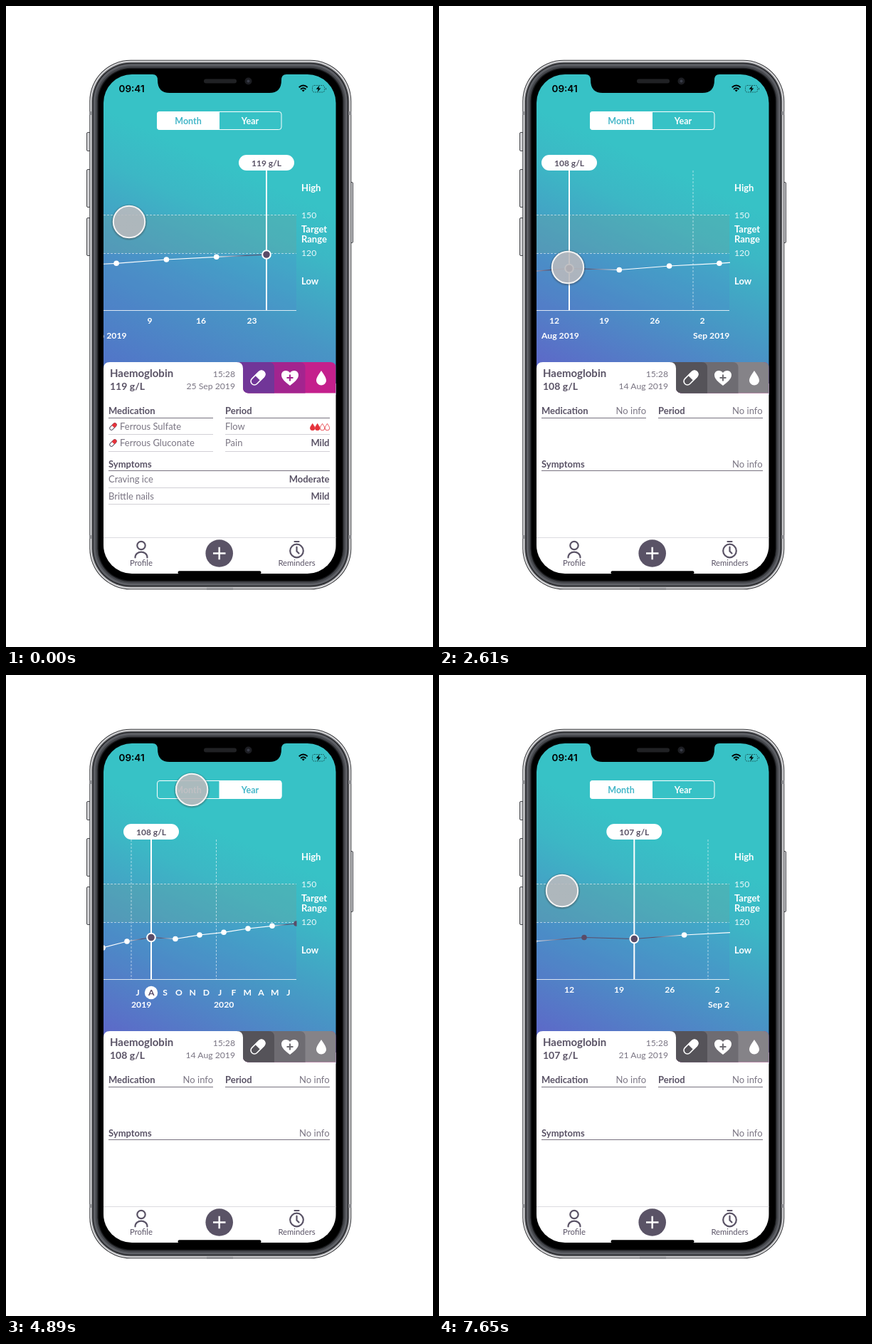
Animation of 600x900 px, one loop 7890 ms. Source, as an HTML page:

```html
<!DOCTYPE html>
<html lang="en">
<head>
<meta charset="utf-8">
<style>
html, body { margin: 0; width: 100%; height: 100%; overflow: hidden; background: #fff; }
svg { display: block; width: 600px; height: 900px; font: 13px Lato, "Open Sans", sans-serif; fill: #5a5366; }
.b { font-weight: 700; }
.w { fill: #fff; }
.l { fill: #7a7583; }
.m { text-anchor: middle; }
.e { text-anchor: end; }
.s { font-size: 12.2px; }
.dash { stroke: #fff; stroke-dasharray: 3 2; opacity: .55; }
.rule { stroke: #77727f; }
.thin { stroke: #d2d0d6; }
.ink { fill: none; stroke: #5a5366; stroke-width: 2.2; stroke-linecap: round; }
</style>
</head>
<body>
<svg viewBox="0 0 600 900">
  <defs>
    <linearGradient id="sky" gradientUnits="userSpaceOnUse" x1="137" y1="145" x2="2" y2="444">
      <stop offset="0" stop-color="#37c2c6"/>
      <stop offset=".2" stop-color="#3cb7c5"/>
      <stop offset=".55" stop-color="#4895c5"/>
      <stop id="deep" offset="1"/>
    </linearGradient>
    <radialGradient id="shadow"><stop offset=".85" stop-color="#333" stop-opacity=".45"/><stop offset="1" stop-color="#333" stop-opacity="0"/></radialGradient>
    <clipPath id="screen"><rect x="137" y="96" width="326.5" height="701" rx="40"/></clipPath>
    <clipPath id="plot"><rect x="137" y="200" width="271.5" height="290"/></clipPath>
    <path id="drop" d="M0-10C3-5 7-1 7 4A7 6.500 0 0 1-7 4C-7-1-3-5 0-10Z"/>
    <g id="pill">
      <rect x="-12" y="-5" width="24" height="10" rx="5" fill="none" stroke-width="1.600"/>
      <path d="M0-5H7A5 5 0 0 1 7 5H0Z"/>
    </g>
    <g id="redpill" transform="rotate(-45) scale(.48)">
      <rect x="-12" y="-5" width="24" height="10" rx="5" fill="#fff" stroke="#5a5366" stroke-width="2"/>
      <path d="M0-5.500H7A5.500 5.500 0 0 1 7 5.500H0Z" fill="#e5323b"/>
    </g>
  </defs>

  <g id="body">
    <g fill="#d3d3d6" stroke="#48494d">
      <rect x="113.500" y="177.500" width="5" height="26" rx="1.500"/>
      <rect x="113.500" y="229.500" width="5" height="53" rx="1.500"/>
      <rect x="113.500" y="297.500" width="5" height="53" rx="1.500"/>
      <rect x="483" y="247.500" width="4.500" height="85" rx="1.500"/>
    </g>
    <g id="shell"></g>
    <path d="M117 150.500h4M481 150.500h4M117 745.500h4M481 745.500h4" stroke="#8d8e92" stroke-width="5"/>
    <path d="M282 818.500h37" stroke="#77787c" stroke-width="2"/>
  </g>

  <g clip-path="url(#screen)">
    <rect x="137" y="96" width="327" height="450" fill="url(#sky)"/>
    <rect x="137" y="293" width="271" height="54" fill="#6d9e98" opacity=".3"/>
    <rect x="137" y="347" width="271" height="80" fill="#5a70cc" opacity=".13"/>

    <rect x="212.500" y="148.500" width="174.500" height="25" rx="3.500" fill="none" stroke="#fff"/>
    <path id="half" d="M216 148H300V174H216A4 4 0 0 1 212 170V152A4 4 0 0 1 216 148Z" fill="#fff"/>
    <g class="b m" font-size="12.500">
      <text id="month" x="256" y="165.500">Month</text>
      <text id="year" x="343" y="165.500">Year</text>
    </g>

    <path class="dash" d="M137 293.500H408M137 347.500H408"/>
    <path d="M137 427.500H408" stroke="#fff" opacity=".8"/>
    <g class="w">
      <g class="b"><text x="415" y="259.500">High</text><text x="415" y="317.500">Target</text><text x="415" y="331.500">Range</text><text x="415" y="391">Low</text></g>
      <g class="s" opacity=".9"><text x="415" y="297.500">150</text><text x="415" y="351">120</text></g>
    </g>

    <g clip-path="url(#plot)">
      <path id="sepLine" class="dash" d="M0 231V427"/>
      <g id="days" class="w b s"></g>
      <g id="months" class="w b s">
        <path class="dash" d="M176 231V427M295.500 231V427"/>
        <circle cx="204" cy="446" r="9.200"/>
      </g>
      <g id="line"></g>
      <g id="marks"></g>
    </g>

    <rect x="137" y="530" width="327" height="270" fill="#fff"/>
    <g id="tabsOn"></g>
    <g id="tabsOff"></g>
    <path d="M137 544V509Q137 500 146 500H324Q333 500 333 509V544Z" fill="#fff"/>
    <g class="w">
      <use href="#pill" transform="translate(354 522) rotate(-45)" stroke="#fff"/>
      <path d="M399 533C393 528 387 524 387 518C387 511 396 510 399 515C402 510 411 511 411 518C411 524 405 528 399 533Z"/>
      <use href="#drop" transform="translate(443 522)"/>
    </g>
    <path id="cross" d="M399 517.500v9M394.500 522h9" stroke-width="2"/>

    <text class="b" x="146" y="521" font-size="15">Haemoglobin</text>
    <text class="e s l" x="322" y="520.500">15:28</text>
    <g id="cards"></g>
    <g class="b"><text x="144" y="573">Medication</text><text x="308" y="573">Period</text><text x="144" y="647.500">Symptoms</text></g>
    <path class="rule" d="M144 578.500H291M308 578.500H455M144 652.500H455"/>

    <g id="details">
      <path class="thin" d="M144 601.500H291M308 601.500H455M144 625.500H291M308 625.500H455M144 676.500H455M144 699.500H455"/>
      <use href="#redpill" transform="translate(150.500 590.500)"/>
      <use href="#redpill" transform="translate(150.500 613.500)"/>
      <g class="l">
        <text x="160" y="595">Ferrous Sulfate</text><text x="160" y="618">Ferrous Gluconate</text>
        <text x="308" y="595">Flow</text><text x="308" y="618">Pain</text>
        <text x="144" y="669">Craving ice</text><text x="144" y="692.500">Brittle nails</text>
      </g>
      <g class="b e"><text x="454.500" y="618">Mild</text><text x="454.500" y="669">Moderate</text><text x="454.500" y="692.500">Mild</text></g>
      <g id="flow" stroke="#e5323b" stroke-width="1.800"></g>
    </g>
    <g id="none" class="e l"><text x="291" y="573">No info</text><text x="454.500" y="573">No info</text><text x="454.500" y="647.500">No info</text></g>

    <path d="M137 746.500H464" stroke="#dcdbe0"/>
    <g class="ink">
      <circle cx="190" cy="757.500" r="5.700"/>
      <path d="M181.500 774.500C181.500 764 198.500 764 198.500 774.500"/>
      <circle cx="408.500" cy="765" r="9.300"/>
      <path d="M408.500 759.500V765.500L411.500 768.500M405.500 752H411.500"/>
    </g>
    <circle cx="299.700" cy="768.500" r="19.300"/>
    <path d="M291 768.500H308.500M299.700 759.700V777.300" stroke="#fff" stroke-width="2.500"/>
    <g class="m" font-size="11.300"><text x="190" y="786">Profile</text><text x="408.500" y="786">Reminders</text></g>
    <rect x="241.500" y="793.300" width="117" height="4" rx="2" fill="#000"/>

    <path d="M206 95V96Q213 96 213 104Q213 122 230 122H370Q387 122 387 104Q387 96 394 96V95Z" fill="#000"/>
    <text x="158.500" y="120.500" fill="#000" font-family="Inter, sans-serif" font-weight="600" font-size="13.500">09:41</text>
    <g fill="none" stroke="#000" stroke-width="1.900">
      <path d="M411.700 114.300Q417.700 108.800 423.700 114.300M414 117Q417.700 113.700 421.400 117"/>
      <rect x="430.500" y="111.500" width="17" height="9.500" rx="2.500" stroke-width=".8" stroke-dasharray="2 1" opacity=".6"/>
    </g>
    <path d="M415.700 118.300Q417.700 116.700 419.700 118.300L417.700 120.500ZM440.500 111.500L435.700 116.800H438.800L437.500 121L442.300 115.500H439.300ZM449 114.500q1.500 1.700 0 3.400z" fill="#000"/>
    <rect x="278" y="102.500" width="46" height="6" rx="3" fill="#202124"/>
    <circle cx="340.500" cy="105.500" r="5" fill="#1c1d22"/><circle cx="340.500" cy="105.500" r="2" fill="#393c48"/>

    <g id="finger">
      <circle r="26" cy=".7" fill="url(#shadow)"/>
      <circle r="22.200" fill="#c9c9cc" fill-opacity=".8" stroke="#f4f4f4" stroke-width="2"/>
    </g>
  </g>
</svg>
<script>
const LOOP = 7890, DRAG = 238.8, STEP = 70.3, YEAR_STEP = 34;
const T = { low: 2450, year: 3600, month: 5450, next: 6550 };
const DARK = [90, 76, 104];
const levels = [383, 374, 368.5, 370.5, 365, 361.3, 356, 352.3, 349];
const path = [[0, 173, 303], [500, 173, 303], [1600, 406, 303], [1720, 406, 303], [2350, 181, 367],
  [2700, 181, 367], [3450, 343, 163], [4150, 343, 163], [4950, 260, 161], [5450, 260, 161],
  [6350, 274.5, 372], [6950, 274.5, 372], [7600, 173, 303], [LOOP, 173, 303]];

const $ = id => document.getElementById(id);
const add = (id, html) => $(id).insertAdjacentHTML('beforeend', html);
const set = (el, attrs) => { for (const k in attrs) el.setAttribute(k, attrs[k]); };
const lerp = (a, b, p) => a + (b - a) * p;
const ramp = (t, start, span = 150) => {
  const p = Math.min(1, Math.max(0, (t - start) / span));
  return (1 - Math.cos(Math.PI * p)) / 2;
};
const mix = (a, b, p) => `rgb(${a.map((v, i) => Math.round(lerp(v, b[i], p)))})`;
const shade = p => mix([255, 255, 255], DARK, p);

// Nested outlines of the phone
[[0, '#38393c'], [1, '#dcdcde'], [2.8, '#8d8e92'], [4, '#232427'], [5.5, '#5e6066'], [8.5, '#45474c'], [11, '#1d1e21'], [12.5, '#000']]
  .forEach(([d, fill]) => add('shell',
    `<rect x="${117.3 + d}" y="${75.8 + d}" width="${368 - 2 * d}" height="${743.5 - 2 * d}" rx="${58 - d}" fill="${fill}"/>`));

function tabs(id, colors) {
  colors.forEach((c, i) => add(id,
    `<path d="M322 500H${[463.5, 420.5, 377][i] - 8}q8 0 8 8V543.500H341Q333 543.500 333 535V510H322Z" fill="${c}"/>`));
}
tabs('tabsOn', ['#c4208c', '#a3248f', '#713698']);
tabs('tabsOff', ['#858388', '#6e6c72', '#555359']);

// Week labels, relative to the 14 Aug point
[[12, -21], [19, 49], [26, 120.3], [2, 187], [9, 257.8], [16, 329.8], [23, 401.3]]
  .forEach(([d, x]) => add('days', `<text class="m" x="${x}" y="445.500">${d}</text>`));
add('days', '<text id="aug" x="-39" y="466.500">Aug 2019</text><text x="174" y="466.500">Sep 2019</text>');
[...'JASONDJFMAMJ'].forEach((c, i) => add('months',
  `<text class="m" x="${185 + i * 19.27}" y="450.300"${i == 1 ? ' fill="#5a4c68"' : ''}>${c}</text>`));
add('months', '<text x="176" y="466.500">2019</text><text x="292" y="466.500">2020</text>');

levels.forEach((y, i) => {
  if (i) add('line', `<linearGradient id="g${i}"><stop/><stop/></linearGradient>
    <line y1="${levels[i - 1]}" y2="${y}" stroke="url(#g${i})" stroke-width="1.200"/>`);
});
levels.forEach(y => add('line', `<circle cy="${y}" r="3.800"/>`));
const segments = document.querySelectorAll('#line line');
const fades = document.querySelectorAll('#line linearGradient');
const dots = document.querySelectorAll('#line circle');

const picks = [[8, 119, '25 Sep'], [2, 108, '14 Aug'], [3, 107, '21 Aug']];
picks.forEach(([i, value, date]) => {
  add('marks', `<g><path d="M0 230V427" stroke="#fff" stroke-width="2"/>
    <rect x="-39" y="209" width="78" height="22" rx="11" fill="#fff"/>
    <text class="m b" y="224.500" font-size="12">${value} g/L</text>
    <circle cy="${levels[i]}" r="5.800" fill="${shade(1)}" stroke="#fff" stroke-width="2"/></g>`);
  add('cards', `<g><text class="b" x="146" y="538.500" font-size="14">${value} g/L</text>
    <text class="e s l" x="322" y="538">${date} 2019</text></g>`);
});
for (let i = 0; i < 4; i++) add('flow',
  `<use href="#drop" transform="translate(${430.7 + i * 6.9} 591) scale(.46)" fill="${i < 2 ? '#e5323b' : '#fff'}"/>`);

function draw(t) {
  const k = path.findIndex((p, i) => i && t <= p[0]);
  const [a, b] = [path[k - 1], path[k]];
  const p = ramp(t, a[0], b[0] - a[0]);
  const fx = lerp(a[1], b[1], p), fy = lerp(a[2], b[2], p);
  set($('finger'), { transform: `translate(${fx} ${fy})` });

  const later = t > 4500;
  const zoom = later ? 1 - ramp(t, T.month, 380) : ramp(t, T.year, 380);
  const yearly = later ? 1 - ramp(t, T.month, 120) : ramp(t, T.year, 120);
  const drag = t < 1700 ? (fx - 173) / 233 : 1;
  const home = later ? 204 : 183 - DRAG * (1 - drag);
  const anchor = lerp(home, 204, zoom);
  const xs = levels.map((_, i) => anchor + (i - 2) * lerp(STEP, YEAR_STEP, zoom));

  const low = ramp(t, T.low), next = ramp(t, T.next);
  const tint = i => i == 8 ? 1 : i == 2 ? low : i == 3 ? next : 0;
  dots.forEach((d, i) => set(d, { cx: xs[i], fill: shade(tint(i)) }));
  segments.forEach((s, i) => {
    set(s, { x1: xs[i], x2: xs[i + 1] });
    // The dark end keeps its colour for part of the segment
    [...fades[i].children].forEach((stop, j) => {
      const dark = tint(i + j);
      set(stop, { 'stop-color': shade(dark), offset: Math.abs(j - .4 * dark) });
    });
  });

  const shown = [1 - low, low * (1 - next), next];
  picks.forEach(([i], n) => {
    set($('marks').children[n], { transform: `translate(${xs[i]})`, opacity: shown[n] });
    set($('cards').children[n], { opacity: shown[n] });
  });
  set($('days'), { transform: `translate(${home})`, opacity: 1 - yearly });
  set($('aug'), { opacity: later ? 0 : 1 });
  set($('months'), { opacity: yearly });
  set($('sepLine'), { transform: `translate(${lerp(home + 174, 278, zoom)})` });
  $('sepLine').style.opacity = .55 * (1 - yearly);

  const isYear = yearly > .5;
  set($('half'), { transform: isYear ? 'translate(599.500) scale(-1 1)' : '' });
  set($('month'), { fill: isYear ? '#fff' : '#45b7c9' });
  set($('year'), { fill: isYear ? '#45b7c9' : '#fff' });

  set($('tabsOff'), { opacity: low });
  set($('details'), { opacity: 1 - low });
  set($('none'), { opacity: low });
  set($('cross'), { stroke: mix([163, 36, 143], [110, 108, 114], low) });
  set($('deep'), { 'stop-color': mix([82, 116, 200], [93, 104, 200], low) });
}

const start = performance.now();
function tick() {
  draw((performance.now() - start) % LOOP);
  requestAnimationFrame(tick);
}
tick();
</script>
</body>
</html>
```
